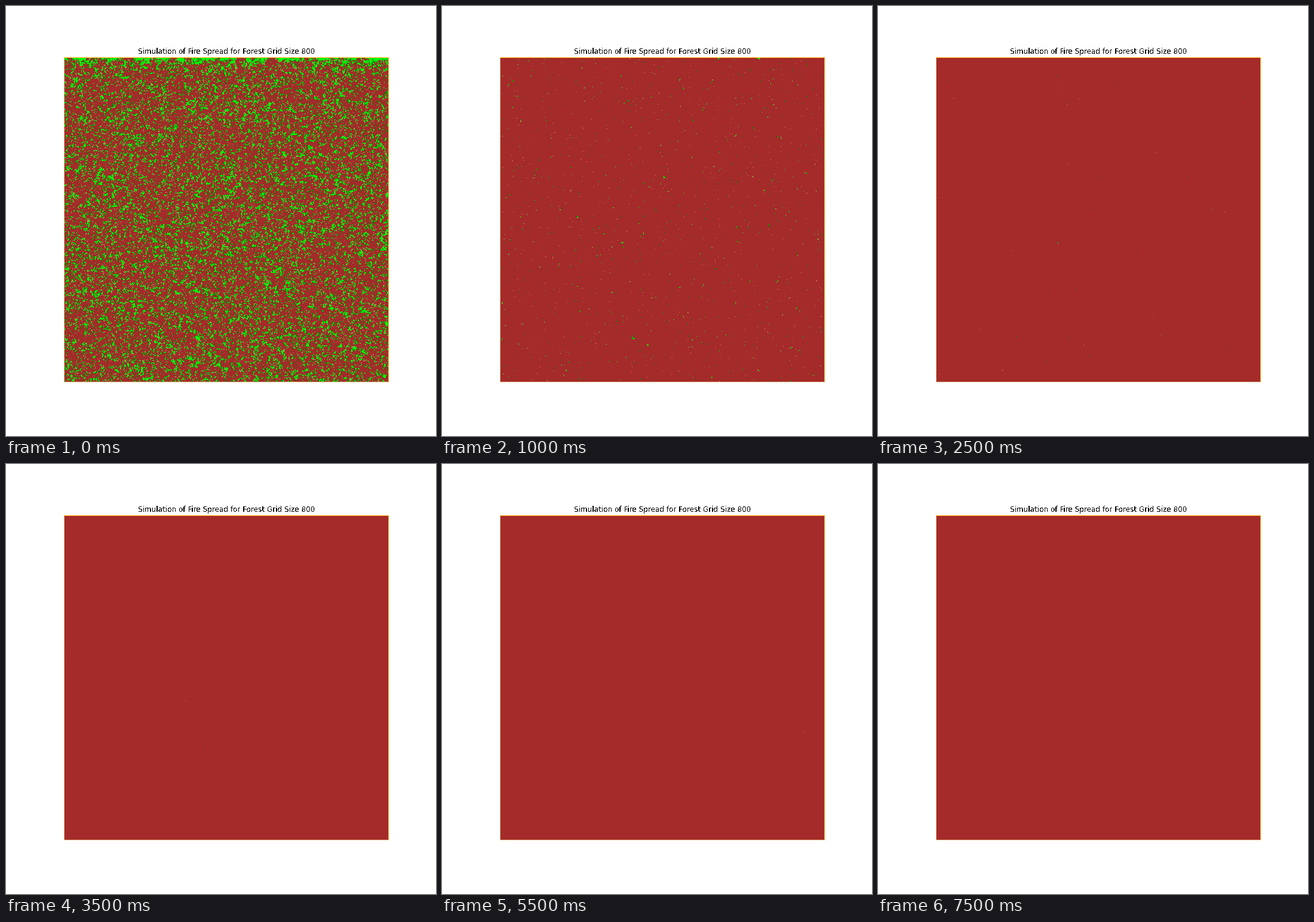
Write a matplotlib script that moves like this. It is 720x720 px and loops after 8 s.

```python
import matplotlib.pyplot as plt
import numpy as np
from matplotlib.animation import FuncAnimation

SIZE = 720                # stage, px
X0, Y0, N = 97, 86, 544   # forest square on the stage, with its 1 px edge
GRID = 800                # forest cells per side
STEPS, STEP_MS = 16, 500
BURNT_OUT = 9             # step at which the last grove is gone

COLORS = np.array([
    (165, 42, 42),    # burnt ground
    (222, 135, 115),  # lone sapling
    (0, 128, 0),      # sparse trees
    (0, 255, 0),      # dense trees
    (255, 165, 0),    # burning edge
    (222, 175, 120),  # faded edge
], dtype=np.uint8)
FIRE, FADED = 4, 5
LEVELS = (0.24, 0.32, 0.62)   # tree density at which the colour changes

rng = np.random.default_rng(800)


def smooth(sigma):
    """Gaussian-blurred noise with unit spread."""
    f = np.fft.fftfreq(GRID)
    blur = np.exp(-2 * (np.pi * sigma) ** 2 * (f[:, None] ** 2 + f ** 2))
    out = np.fft.ifft2(np.fft.fft2(rng.standard_normal((GRID, GRID))) * blur).real
    return out / out.std()


def shrink_matrix(n):
    """Hann-window weights that take GRID cells to n pixels."""
    scale = GRID / n
    centres = (np.arange(n) + 0.5) * scale
    d = np.abs(centres[:, None] - np.arange(GRID) - 0.5) / scale
    w = np.where(d < 1, 0.5 + 0.5 * np.cos(np.pi * d), 0)
    return w / w.sum(axis=1, keepdims=True)


shrink = shrink_matrix(N - 2)
hardiness = 0.85 * smooth(0.7) + 0.5 * smooth(2.2)
depth = np.arange(GRID)[:, None]
fringe = np.exp(-depth / 9) * (1.7 + 0.9 * smooth(7))   # fire reaches the top last


def trees_left(step):
    """Cells still standing: the hardiest share, falling with time."""
    if step < BURNT_OUT:
        share = 0.2 * np.exp(-2.1 * step ** 0.8)
        field = hardiness + fringe * 0.45 ** step
        return field > np.quantile(field, 1 - share)
    cells = np.zeros((GRID, GRID), dtype=bool)
    for _ in range((step - BURNT_OUT) % 3):   # now and then a sapling
        r, c = rng.integers(0, GRID, 2)
        cells[r, c] = True
    return cells


def picture(step):
    density = shrink @ trees_left(step).astype(float) @ shrink.T
    kinds = np.full((N, N), FADED)
    kinds[0] = FIRE
    kinds[:, -1] = FIRE
    kinds[1:-1, 1:-1] = np.digitize(density, LEVELS)
    return COLORS[kinds]


pictures = [picture(s) for s in range(STEPS)]

fig = plt.figure(figsize=(10, 10), dpi=72, facecolor="white")
ax = fig.add_axes([X0 / SIZE, 1 - (Y0 + N) / SIZE, N / SIZE, N / SIZE])
ax.axis("off")
image = ax.imshow(pictures[0], interpolation="nearest", aspect="auto")
fig.text(369 / SIZE, 1 - 80.4 / SIZE,
         "Simulation of Fire Spread for Forest Grid Size 800",
         family="DejaVu Sans", fontsize=12, ha="center", va="baseline",
         antialiased=False)


def update(step):
    image.set_data(pictures[step])
    return [image]


anim = FuncAnimation(fig, update, frames=STEPS, init_func=lambda: update(0),
                     interval=STEP_MS, repeat=True, repeat_delay=0)
plt.show()
```
